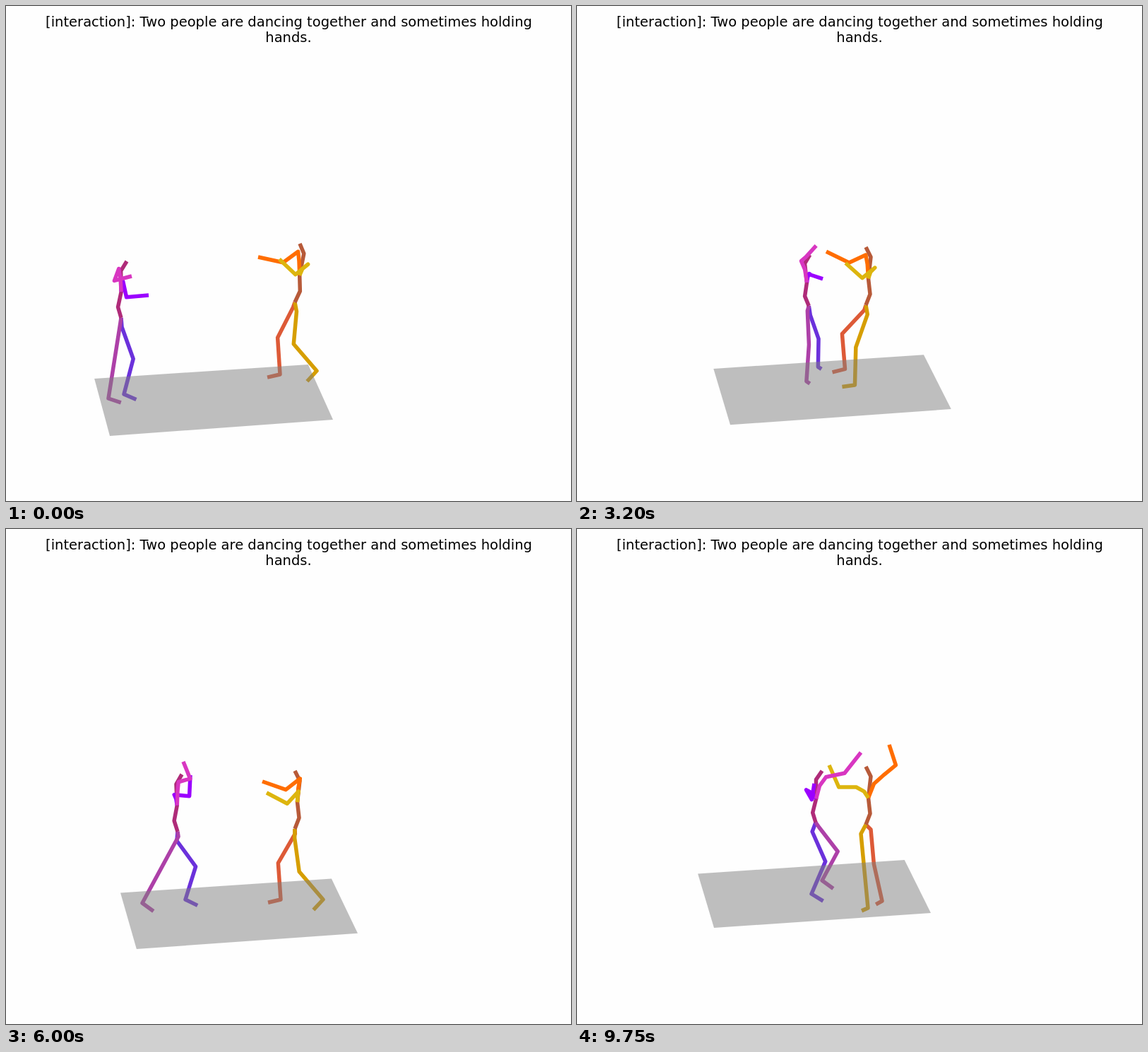
An HTML page that plays this animation: 800 by 700 pixels, repeating every 9800 ms.

```html
<!DOCTYPE html>
<html lang="en">
<head>
<meta charset="utf-8">
<title>Two dancers</title>
<style>
  html, body { margin: 0; width: 100%; height: 100%; overflow: hidden; background: #fefefe; }
  svg { display: block; width: 800px; height: 700px; }
  text { font: 19.5px "DejaVu Sans", sans-serif; text-anchor: middle; fill: #000; }
  polyline { fill: none; stroke-width: 5.5; stroke-linejoin: round; }
  polygon { fill: rgba(128, 128, 128, .5); }
</style>
</head>
<body>
<svg id="stage" viewBox="0 0 800 700">
  <text x="400.5" y="29">[interaction]: Two people are dancing together and sometimes holding</text>
  <text x="400" y="51">hands.</text>
</svg>
<script>
const LOOP = 9800, STEP = 50, TOUCH = 14;
const ARM = 68, LEG = 104, FOOT = 18, TALL = 82;
const stage = document.getElementById('stage');

// Smooth curve through [time, value] keys that never overshoots.
function curve(keys) {
  const slope = keys.slice(1).map(([t, v], i) => (v - keys[i][1]) / (t - keys[i][0]));
  const tangent = keys.map((_, i) => {
    const a = slope[i - 1] ?? slope[i], b = slope[i] ?? a;
    return a * b > 0 ? 2 * a * b / (a + b) : 0;
  });
  return t => {
    let i = 0;
    while (i < keys.length - 2 && t >= keys[i + 1][0]) i++;
    const [[t0, v0], [t1, v1]] = keys.slice(i, i + 2);
    const h = t1 - t0, u = Math.min(1, (t - t0) / h), v = 1 - u;
    return v * v * (1 + 2 * u) * v0 + u * u * (1 + 2 * v) * v1
      + h * u * v * (v * tangent[i] - u * tangent[i + 1]);
  };
}

// The view follows the partner, so the floor slides: its right and bottom edges.
const floorRight = curve([[0, 463], [1000, 500], [2400, 550], [4050, 505],
  [6000, 498], [7300, 539], [9750, 501]]);
const floorBottom = curve([[0, 608], [1000, 605], [1700, 616], [2400, 601],
  [4050, 588], [6000, 594], [7300, 577], [9750, 564]]);

function floorPoints(t) {
  const r = floorRight(t), b = floorBottom(t);
  const near = (b - 564) / 44, lean = (r - 505) * .055;
  return [
    r - 330 - 9 * near - lean / 2, b - 76.5 - 4.5 * near,
    r - 37.5 - lean, b - 96 - 5 * near,
    r, b - 21 - 2 * near,
    r - 307 - 9 * near, b
  ];
}

function add(tag, attrs = {}) {
  const el = document.createElementNS(stage.namespaceURI, tag);
  for (const key in attrs) el.setAttribute(key, attrs[key]);
  return stage.appendChild(el);
}

const mix = (a, b, kx, ky = kx) => [a[0] + (b[0] - a[0]) * kx, a[1] + (b[1] - a[1]) * ky];

// Knee or elbow between a and b; a limb looks shorter the more it folds.
function hinge(a, b, length, share, bend) {
  const dx = b[0] - a[0], dy = b[1] - a[1], d = Math.hypot(dx, dy) || 1;
  const total = Math.max(d, (d + length) / 2);
  const upper = total * share, lower = total - upper;
  const along = (d * d + upper * upper - lower * lower) / (2 * d);
  const out = bend * Math.sqrt(Math.max(0, upper * upper - along * along));
  return [a[0] + (dx * along - dy * out) / d, a[1] + (dy * along + dx * out) / d];
}

// dir: +1 faces right; far: index of the limbs on the far side; onFloor: moves with the floor.
class Dancer {
  constructor(colors, dir, far, onFloor) {
    Object.assign(this, { dir, far, onFloor, poses: [] });
    this.lines = colors.map(stroke => add('polyline', { stroke }));
  }

  // turn: sideways shoulder offset; face: how far seen in profile; elbow: +1 down, -1 up.
  pose(time, { root, head = [root[0], root[1] - TALL], hands, feet, turn, face = 1, elbow = 1 }) {
    const values = [...root, ...head, ...hands, ...feet, turn, face, elbow];
    this.poses.push([time, values.map((v, i) => v - this.shift(i, time))]);
  }

  shift(i, t) {
    if (!this.onFloor || i > 11) return 0;
    return i % 2 ? floorBottom(t) : floorRight(t);
  }

  ready() {
    this.tracks = this.poses[0][1].map((_, i) => curve(this.poses.map(([t, v]) => [t, v[i]])));
  }

  draw(t) {
    const v = this.tracks.map((track, i) => track(t) + this.shift(i, t));
    const point = i => v.slice(2 * i, 2 * i + 2);
    const [turn, face, elbow] = v.slice(12);
    const root = point(0), head = point(1), hands = [point(2), point(3)];
    const forward = this.dir * face;

    const back = (k, bow) => {
      const [x, y] = mix(root, head, k);
      return [x - this.dir * bow, y];
    };
    const chest = back(.46, 3.5), neck = back(.83, 7);
    const spine = [root, back(.19, 6), chest, neck, head];
    const [mx, my] = mix(neck, chest, .2);

    const arms = [], legs = [];
    for (const i of [0, 1]) {
      const side = i === this.far ? 1 : -1;
      const shoulder = [mx + side * turn, my - side * 9], hand = hands[i];
      const reach = hand[0] - shoulder[0];
      const down = reach / Math.hypot(reach, 5);
      arms.push([chest, mix(chest, shoulder, .35, .6), shoulder,
        hinge(shoulder, hand, ARM, .42, down * elbow), hand]);

      const hip = [root[0] + side * turn * .35, root[1] + 10 - side * 3], ankle = point(4 + i);
      const knee = hinge(hip, ankle, LEG, .48, -forward);
      const sx = ankle[0] - knee[0], sy = ankle[1] - knee[1];
      const k = FOOT * forward / Math.hypot(sx, sy);
      legs.push([root, hip, knee, ankle, [ankle[0] + sy * k, ankle[1] - sx * k + 3]]);
    }
    [...legs, spine, ...arms].forEach((limb, i) => this.lines[i].setAttribute('points', limb.join(' ')));
    return hands;
  }
}

const partner = new Dancer(['#dd5a37', '#d69e00', '#b75a39', '#ff6d00', '#ddb50e'], -1, 0, false);
const lead = new Dancer(['#6b31db', '#ad40a8', '#af2b79', '#9b00ff', '#d836c1'], 1, 1, true);
const dots = [add('circle', { r: 2.4, fill: '#3cc8c8' }), add('circle', { r: 2.4, fill: '#3cc8c8' })];
const floor = add('polygon');

lead.pose(0, { root: [163, 441], head: [171, 361], hands: [202, 409, 178, 382], feet: [167, 549, 145, 555], turn: -3 });
lead.pose(1000, { root: [268, 441], head: [273, 363], hands: [313, 394, 277, 395], feet: [273, 527, 268, 544], turn: -5 });
lead.pose(2400, { root: [326, 438], head: [338, 363], hands: [389, 374, 314, 370], feet: [327, 514, 326, 548], turn: -20, face: -.4 });
lead.pose(4050, { root: [324, 414], head: [313, 344], hands: [293, 404, 363, 318], feet: [352, 513, 317, 517], turn: 10, elbow: -1 });
lead.pose(6000, { root: [243, 428], head: [249, 347], hands: [261, 348, 251, 329], feet: [254, 524, 193, 529], turn: 3 });
lead.pose(7300, { root: [340, 406], head: [335, 336], hands: [354, 317, 358, 299], feet: [325, 481, 341, 488], turn: 9 });
lead.pose(9750, { root: [338, 415], head: [347, 342], hands: [336, 360, 402, 316], feet: [332, 516, 347, 497], turn: 14 });

partner.pose(0, { root: [409, 419], head: [416, 336], hands: [357, 355, 387, 358], feet: [388, 521, 440, 516], turn: -7 });
partner.pose(1000, { root: [409, 430], hands: [352, 346, 370, 373], feet: [437, 506, 401, 540], turn: -6 });
partner.pose(2400, { root: [409, 425], hands: [345, 373, 388, 374], feet: [348, 511, 387, 535], turn: -12 });
partner.pose(4050, { root: [409, 422], hands: [362, 319, 371, 352], feet: [414, 516, 407, 537], turn: 0 });
partner.pose(6000, { root: [409, 424], hands: [363, 357, 369, 373], feet: [389, 524, 449, 524], turn: 1 });
partner.pose(7300, { root: [409, 426], hands: [361, 326, 384, 346], feet: [424, 523, 411, 537], turn: -2 });
partner.pose(9750, { root: [409, 418], hands: [442, 305, 357, 334], feet: [432, 526, 412, 536], turn: 20, face: .5 });

lead.ready();
partner.ready();

function draw(t) {
  const leadHands = lead.draw(t), partnerHands = partner.draw(t);
  floor.setAttribute('points', floorPoints(t).join(' '));
  // Mark a hand that meets one of the partner's hands.
  leadHands.forEach(([x, y], i) => {
    const touching = partnerHands.some(([px, py]) => Math.hypot(px - x, py - y) < TOUCH);
    dots[i].setAttribute('cx', x);
    dots[i].setAttribute('cy', y);
    dots[i].setAttribute('visibility', touching ? 'visible' : 'hidden');
  });
}

const start = performance.now();
function tick() {
  const t = (performance.now() - start) % LOOP;
  draw(Math.floor(t / STEP) * STEP);
  requestAnimationFrame(tick);
}
tick();
</script>
</body>
</html>
```
